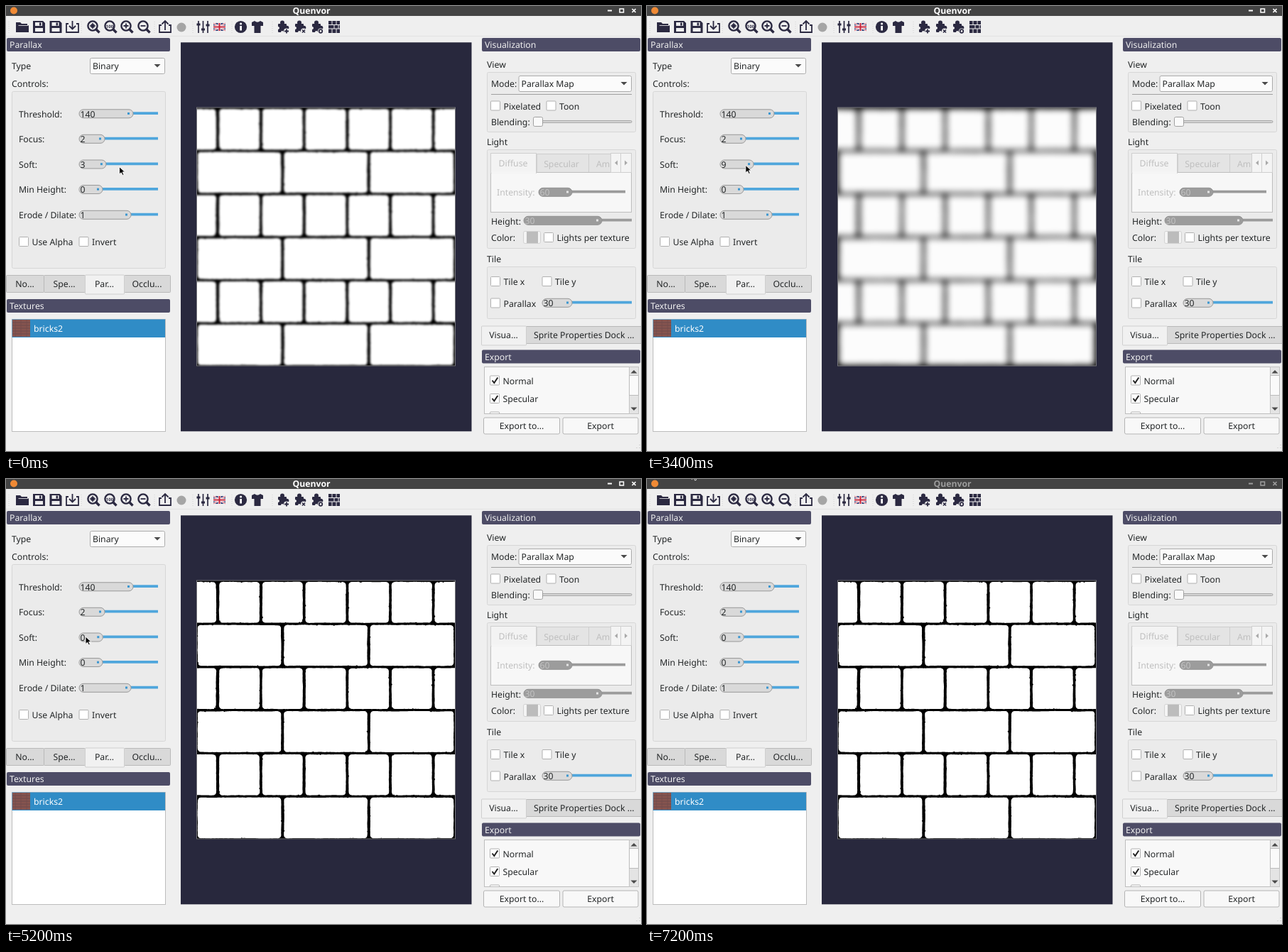
Recreate the animation shown at these times as an HTML page. Size 894 by 627 pixels, loop 7.4 s.

```html
<!DOCTYPE html>
<html lang="en">
<head>
<meta charset="utf-8">
<title>Parallax editor</title>
<style>
  html, body { margin: 0; width: 100%; height: 100%; overflow: hidden; background: #efefef; }
  svg { display: block; width: 894px; height: 627px; }
  text { font: 12.25px "Noto Sans", "Open Sans", sans-serif; white-space: pre; text-rendering: geometricPrecision; }
</style>
</head>
<body>
<svg id="stage" viewBox="0 0 894 627" xmlns="http://www.w3.org/2000/svg"></svg>
<script>
const INK = '#2b2941', TEXT = '#232627', BLUE = '#4fa6dc', FADED = '#bfbfbf', EDGE = '#b4b4b4';
const LOOP = 7400, TICK = 100;

const rect = (x, y, w, h, fill, stroke = 'none', rx = 0) =>
  `<rect x="${x}" y="${y}" width="${w}" height="${h}" rx="${rx}" fill="${fill}" stroke="${stroke}"/>`;
const path = (d, fill = INK, stroke = 'none', width = 1) =>
  `<path d="${d}" fill="${fill}" fill-rule="evenodd" stroke="${stroke}" stroke-width="${width}"/>`;
const line = (d, width = 2, stroke = INK) => path(d, 'none', stroke, width);
const disc = (x, y, r, fill = INK, stroke = 'none', width = 1) =>
  `<circle cx="${x}" cy="${y}" r="${r}" fill="${fill}" stroke="${stroke}" stroke-width="${width}"/>`;
const label = (x, y, s, fill = TEXT, anchor = 'start') =>
  `<text x="${x}" y="${y}" fill="${fill}" text-anchor="${anchor}">${s}</text>`;

const header = (x, y, w, s) => rect(x, y, w, 19, '#4d4c66', 'none', 2) + label(x + 4, y + 14.3, s, '#f0f0f0');
const group = (x, y, w, h) => rect(x + .5, y + .5, w, h, '#ebebeb', '#d6d6d6', 2);
const arrow = (x, y, dir = 1, fill = '#4a4a4a') => path(`M${x - 4.5} ${y - 2 * dir}h9l-4.5 ${4.5 * dir}z`, fill);
const combo = (x, y, w, s) =>
  rect(x + .5, y + .5, w, 22, '#fbfbfb', '#ababab', 2) + label(x + 4, y + 16, s) + arrow(x + w - 10, y + 11);
const check = (x, y, s, on) => rect(x + .5, y + .5, 13, 13, '#fff', '#b0b0b0', 1) +
  (on ? line(`M${x + 3.5} ${y + 7}l2.8 3.5 5-7.5`, 2, '#222') : '') + label(x + 18.5, y + 12, s);
const button = (x, y, w, s) =>
  rect(x + .5, y + .5, w, 23, '#f8f8f8', EDGE, 2) + label(x + w / 2 + .5, y + 16.5, s, TEXT, 'middle');
const tab = (x, y, w, h, s, active) =>
  rect(x + .5, y + .5, w, h, active ? '#f1f1f1' : '#d9d9d9', active ? '#cfcfcf' : '#b9b9b9', 1) +
  label(x + w / 2, y + 17, s, TEXT, 'middle');

function slider(x, y, end, max, value, off = false) {
  return line(`M${end} ${y - .4}H${max}`, 3.8, off ? '#9b9b9b' : BLUE) +
    rect(x, y - 5.7, end - x, 12, off ? '#9c9c9c' : '#d9d9d9', off ? '#929292' : '#989898', 6) +
    rect(end - 8, y - 1.5, 3, 3, off ? '#e4e4e4' : '#3d97d0') +
    label(x + 1.5, y + 5, value, off ? '#c2c2c2' : TEXT);
}

const floppy = x => path(`M${x} 21h14l3 3v14h-17zM${x + 3} 23v5h10v-5zM${x + 3} 31v5h11v-5z`) +
  rect(x + 9, 23.5, 2.5, 4, INK);
const lens = (x, glyph) => disc(x - 1, 28, 6.6, '#efefef', INK, 2.4) +
  line(`M${x + 4} 33l4.5 4.5`, 3.4) + glyph;
const puzzle = (x, badge) => rect(x - 7, 25, 12, 12, INK, 'none', 1) + disc(x - 1, 23.5, 3) + disc(x + 5.5, 30.5, 2.8) +
  disc(x - 7, 31, 2, '#efefef') + disc(x - 1, 37, 2, '#efefef') + disc(x + 5, 35.5, 4, '#efefef') + badge;

function toolbar() {
  const flag = rect(292, 24, 17, 11, '#27346f') +
    line('M292 24l17 11M309 24l-17 11', 2.4, '#fff') + line('M292 24l17 11M309 24l-17 11', .8, '#c8283c') +
    line('M300.5 24v11M292 29.5h17', 4, '#fff') + line('M300.5 24v11M292 29.5h17', 2.2, '#c8283c');
  const wall = rect(454, 21, 16, 17, INK) +
    line('M454 26.5h16M454 32h16M459 21v5M465 21v5M462 27v5M468 27v5M459 32v6M465 32v6', 1, '#efefef');
  const grips = [4, 106, 209, 263, 318, 375].map(x =>
    `<path d="M${x} 22v16" stroke="#d2d2d2" stroke-dasharray="1 2"/>`).join('');
  return line('M0 42.5h894', 1, '#e2e2e2') + grips +
    path('M14 23h6l2 2h8v2h2v10h-18z') + line('M17.5 27.5h14', .8, '#efefef') + floppy(38) + floppy(61.5) +
    line('M88 25h-3v12h17v-12h-3', 1.8) + line('M93.5 21v11M89 28l4.5 4.5 4.5-4.5', 1.8) +
    lens(123, rect(119.5, 25.5, 5, 5, INK) + line('M118 28h8M122 24v8', 1.5)) +
    lens(147, '<text x="146" y="30.5" text-anchor="middle" style="font-size:6px;font-weight:700" fill="#2b2941">100</text>') +
    lens(170, line('M165.5 28h7M169 24.5v7', 1.8)) + lens(194, line('M189.5 28h7', 1.8)) +
    line('M219 27h-3v10h16v-10h-3', 1.8) + line('M224 34v-12M219.5 25.5l4.5-4.5 4.5 4.5', 1.8) +
    disc(247, 30, 6.5, '#a5a5a5') +
    line('M271 21v17M277.5 21v17M284 21v17', 1.7) + line('M268.5 26h5M275 33h5M281.5 27h5', 3) + flag +
    disc(330.5, 29.5, 8.6) + rect(329.2, 28, 2.8, 6.5, '#fff') + disc(330.6, 25, 1.6, '#fff') +
    path('M350 21q4 3.5 8 0l4 2v5h-3.5v10h-9v-10h-3.5v-5z') +
    puzzle(390, line('M395 32.5v6M392 35.5h6', 1.8)) +
    puzzle(414, line('M417 33.5l4 4M421 33.5l-4 4', 1.6)) +
    puzzle(438, disc(443, 35.5, 2.3, 'none', INK, 1.7)) + wall;
}

function leftPanel() {
  const names = ['Threshold:', 'Focus:', 'Soft:', 'Min Height:', 'Erode / Dilate:'];
  return header(1, 45, 230, 'Parallax') + label(8, 89, 'Type') + combo(118, 73, 105, 'Binary') +
    label(8, 114, 'Controls:') + group(8, 120, 216, 249) +
    names.map((s, i) => label(18, 156.5 + 35.6 * i, s)).join('') +
    slider(103, 151.5, 179, 214, '140') + slider(103, 187, 139, 214, '2') +
    slider(103, 258.2, 136, 214, '0') + slider(103, 294, 176, 214, '1') +
    check(18, 325, 'Use Alpha') + check(102.5, 325, 'Invert') +
    tab(0, 379, 53, 24, 'No...') + tab(53, 379, 58, 24, 'Spe...') + tab(166, 379, 65, 24, 'Occlu...') +
    tab(111, 378.5, 55, 27, 'Par...', true) +
    header(1, 413, 230, 'Textures') + rect(8.5, 441.5, 216, 158, '#fff', '#bdbdbd') +
    rect(8.5, 441.5, 215.5, 25.5, '#308cc6') + rect(9, 442, 25, 24, '#86544f') +
    line('M9 446h25M9 450h25M9 454h25M9 458h25M9 462h25', .8, '#66474a') +
    line('M13 442v24M21 442v24M29 442v24', .8, '#744d4c') +
    label(39, 459, 'bricks2', '#fff');
}

function rightPanel() {
  return header(670, 45, 223, 'Visualization') + label(677, 87, 'View') + group(677, 93, 209, 84) +
    label(683, 114, 'Mode:') + combo(721.5, 98, 158.5, 'Parallax Map') + line('M683 124.5h198', 1.2, '#9f9f9f') +
    check(682, 133.5, 'Pixelated') + check(760.5, 133.5, 'Toon') + label(683, 168, 'Blending:') +
    rect(749, 161.5, 132, 3, '#d3d3d3', '#a8a8a8', 1.5) + rect(742.5, 156.5, 13, 13, '#fafafa', '#a0a0a0', 2) +
    label(677, 196, 'Light') + group(677, 202, 209, 139) +
    rect(747.5, 208.5, 73, 26, '#e4e4e4', '#cecece') + rect(820.5, 208.5, 32, 26, '#e4e4e4', '#cecece') +
    rect(682.5, 234.5, 198, 56, '#f7f7f7', '#bebebe') + rect(682.5, 207.5, 64, 28, '#f3f3f3', '#cfcfcf') +
    rect(683.5, 233, 62.5, 4, '#f5f5f5') +
    label(714, 226, 'Diffuse', FADED, 'middle') + label(782, 227, 'Specular', FADED, 'middle') + label(831, 227, 'Am', FADED) +
    rect(851.5, 207.5, 14, 27, '#f4f4f4', '#cfcfcf') + rect(865.5, 207.5, 15, 27, '#f4f4f4', '#cfcfcf') +
    path('M861 217.5v7l-4-3.5zM871 217.5v7l4-3.5z', '#aaa') +
    label(691, 267, 'Intensity:', FADED) + slider(750, 262, 797, 872, '60', true) +
    label(683, 308, 'Height:') + slider(729, 302, 839, 881, '30', true) +
    label(683, 331, 'Color:') + rect(728.5, 317.5, 24, 17, '#f4f4f4', '#d2d2d2', 2) + rect(733, 318, 16, 16, '#bcbcbc') +
    check(757, 319, 'Lights per texture') +
    label(677, 361, 'Tile') + group(677, 367, 209, 73) + check(682, 381, 'Tile x') + check(754.5, 381, 'Tile y') +
    check(682, 411.5, 'Parallax') + slider(755, 418, 797, 881, '30') +
    rect(732.5, 451.5, 170, 24, '#d9d9d9', '#b9b9b9') + label(743, 468, 'Sprite Properties Dock ...') +
    tab(669, 450.5, 63, 27, 'Visua...', true) + header(670, 484.5, 223, 'Export') +
    rect(673.5, 508.5, 217, 66, '#f8f8f8', '#bdbdbd') +
    check(681, 520.5, 'Normal', true) + check(681, 546, 'Specular', true) +
    '<clipPath id="list"><path d="M674 509h203v65h-203z"/></clipPath><g clip-path="url(#list)">' + check(681, 571.5, '', true) + '</g>' +
    rect(877.5, 508.5, 13, 66, '#e4e4e4', '#c4c4c4') + rect(877.5, 520.5, 13, 28, '#fafafa', '#bbb') +
    arrow(884, 515.5, -1) + arrow(884, 567.5) +
    button(672, 579.5, 107, 'Export to...') + button(783.5, 579.5, 106, 'Export') +
    path('M892 618v1M892 622v1M888 622v1', 'none', '#bbb');
}

let seed = 7;
const random = () => (seed = seed * 16807 % 2147483647) / 2147483647;
const clamp = (v, lo, hi) => Math.min(hi, Math.max(lo, v));

// Walks a rounded rectangle, letting its outline wander and adding a rare nick.
function brick(x, y, w, h, r = 4.5) {
  const points = [], step = 1.5;
  let drift = 0;
  const add = (px, py) => {
    const cx = clamp(px, x + r, x + w - r), cy = clamp(py, y + r, y + h - r);
    const dx = px - cx, dy = py - cy;
    drift = drift * .85 + (random() - .5) * .3;
    const nick = random() < .03 ? 1.2 * random() : 0;
    const k = (r + drift - nick) / Math.hypot(dx, dy);
    points.push(`${(cx + dx * k).toFixed(1)} ${(cy + dy * k).toFixed(1)}`);
  };
  for (let s = 0; s < w; s += step) add(x + s, y);
  for (let s = 0; s < h; s += step) add(x + w, y + s);
  for (let s = 0; s < w; s += step) add(x + w - s, y + h);
  for (let s = 0; s < h; s += step) add(x, y + h - s);
  return `M${points.join('L')}z`;
}

// Cut bricks run past the sides so that the blur sees the edge colour continued.
function wallPath() {
  let d = '';
  for (let row = 0; row < 6; row++) {
    const y = 145 + 60.75 * row;
    if (row % 2) {
      for (let i = 0; i < 3; i++) d += brick(269.8 + 121.5 * i, y, 117.5, 57.5);
    } else {
      d += brick(200, y, 95.8, 57.5) + brick(603.5, y, 90, 57.5);
      for (let i = 0; i < 5; i++) d += brick(300.2 + 60.7 * i, y, 56.8, 57.5);
    }
  }
  return d;
}

document.getElementById('stage').innerHTML =
  `<defs><clipPath id="frame"><path d="M268 143h365v364.5h-365z"/></clipPath>
  <filter id="soften" filterUnits="userSpaceOnUse" x="200" y="75" width="500" height="500" color-interpolation-filters="sRGB">
  <feGaussianBlur id="blur" stdDeviation="1"/></filter></defs>` +
  rect(0, 0, 894, 627, '#efefef') + rect(0, 0, 894, 14, '#444') + disc(11, 6.5, 5, '#f08a35') +
  `<g id="caption"><text x="430" y="11" text-anchor="middle" fill="currentColor" style="font-weight:600">Quenvor</text>` +
  line('M847 6.5h6', 2, 'currentColor') + line('M864 4h5.5v5h-5.5z', 1.5, 'currentColor') +
  line('M881.5 4l5 5M886.5 4l-5 5', 1.7, 'currentColor') + '</g>' +
  toolbar() + leftPanel() + rightPanel() + rect(246, 51.3, 409.5, 548, '#28283d') +
  `<g clip-path="url(#frame)"><g id="wall">${rect(160, 40, 580, 570, '#000')}<path id="bricks" d="${wallPath()}"/></g></g>` +
  rect(268.5, 143, 364, 364, 'none', '#77777c') +
  '<g id="soft"></g>' +
  `<g id="cursor">${path('M0 0V10.5L2.6 8.2L4.6 12L6.4 11.2L4.6 7.4H8z', '#000', '#fff', .9)}</g>`;

const part = id => document.getElementById(id);
const [caption, wall, bricks, blur, soft, cursor] = ['caption', 'wall', 'bricks', 'blur', 'soft', 'cursor'].map(part);

// Each move: first tick, last tick, then cursor x, cursor y, slider value, rendered softness.
const START = [159.5, 226.5, 3, 3];
const MOVES = [
  [2, 7, 133, 220, 3, 3], [9, 9, 132, 219, 3, 3], [14, 14, 135, 218, 6, 3],
  [15, 21, 156, 221, 19, 22], [22, 24, 161, 223, 22, 22], [27, 27, 159, 224, 21, 22],
  [28, 28, 161, 223, 22, 22], [30, 36, 130, 225, 4, 6], [37, 37, 128, 225, 3, 3],
  [38, 40, 117, 224, 0, 0], [43, 44, 124, 224, 2, 0], [46, 46, 133, 225, 6, 6],
  [47, 47, 128, 225, 3, 4], [49, 49, 117, 224, 0, 1], [51, 52, 112, 222, 0, 0],
  [54, 55, 134, 225, 6, 6], [57, 57, 128.5, 225, 3, 6], [58, 61, 113, 222, 0, 0],
  [63, 64, 112, 219, 0, 0], [66, 72, 63, -10, 0, 0]
];

function stateAt(tick) {
  let state = START;
  for (const [first, last, ...goal] of MOVES) {
    if (tick < first) break;
    const k = Math.min(1, (tick - first + 1) / (last - first + 1));
    state = state.map((v, i) => v + (goal[i] - v) * k);
  }
  return state;
}

let shown = -1;
function draw(time) {
  const tick = Math.floor(time % LOOP / TICK);
  if (tick === shown) return;
  shown = tick;
  const [x, y, value, softness] = stateAt(tick);
  const amount = Math.round(value), white = Math.round(255 - .03 * softness ** 2);
  cursor.setAttribute('transform', `translate(${x} ${y})`);
  soft.innerHTML = slider(103, 222.7, 136.3 + 1.53 * amount, 214, amount);
  bricks.setAttribute('fill', `rgb(${white},${white},${white})`);
  blur.setAttribute('stdDeviation', .25 + .38 * softness + .0055 * softness ** 2);
  if (softness < .2) wall.removeAttribute('filter');
  else wall.setAttribute('filter', 'url(#soften)');
  caption.setAttribute('color', tick >= 71 ? '#9c9c9c' : '#fff');
}

const begin = performance.now();
function loop() {
  draw(performance.now() - begin);
  requestAnimationFrame(loop);
}
loop();
</script>
</body>
</html>
```
